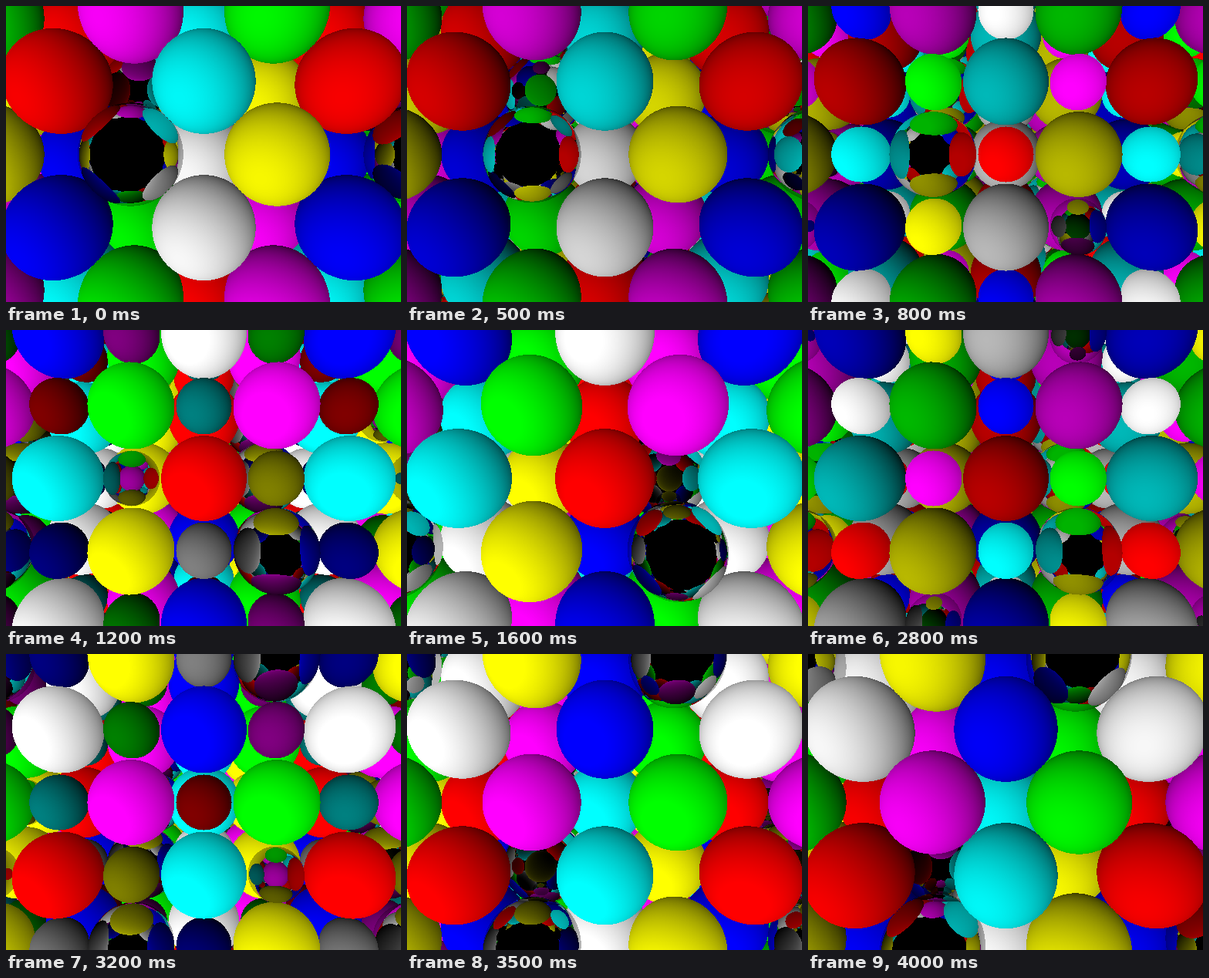
Write an HTML page with a canvas that moves like this. It is 512 by 384 pixels and loops after 4100 ms.

```html
<!DOCTYPE html>
<html lang="en">
<head>
<meta charset="utf-8">
<title>Sliced sphere lattice</title>
<style>
html, body { margin: 0; width: 100%; height: 100%; overflow: hidden; background: #000; }
canvas { display: block; width: 512px; height: 384px; }
</style>
</head>
<body>
<canvas id="view" width="512" height="384"></canvas>
<script>
// A packing of 4D spheres, seen as a 3D slice that moves along w.
const W = 512, H = 384, STEP = 100, COUNT = 41, SPEED = 0.05;
const R = 0.713, R2 = R * R, FOCAL = 466, DIST = 5, LAYERS = 12;
const LIGHT = [-0.4, 0.4, -0.75, -0.6], AMBIENT = 0.5, MIRROR = 0.7;
// RGB bits per colour index; 0 is the mirror
const HUES = [0, 3, 2, 7, 6, 4, 5, 1];
const BLACK = 0xff000000;

const ctx = document.getElementById('view').getContext('2d');
const depth = new Float32Array(W * H);
const owner = new Int16Array(W * H);
const cache = [];

const hueAt = (i, j, k, l) => HUES[(2 * i + j + k + 3 * l - 6) & 7];

function shade(hue, gain, nx, ny, nz, nw) {
  const dot = nx * LIGHT[0] + ny * LIGHT[1] + nz * LIGHT[2] + nw * LIGHT[3];
  const lit = Math.min(1, Math.max(0, AMBIENT + 0.5 * dot / R));
  const v = Math.round(255 * gain * lit);
  return (BLACK | (hue & 4 ? v : 0) | (hue & 2 ? v << 8 : 0) | (hue & 1 ? v << 16 : 0)) >>> 0;
}

// Follows a unit ray from p along d through the lattice, bouncing off mirrors.
function trace(px, py, pz, pw, dx, dy, dz, dw) {
  let gain = MIRROR;
  for (let bounce = 0; bounce < 6; bounce++) {
    let hit = false;
    for (let t = 0.1; t < 14; t += 0.2) {
      const x = px + dx * t, y = py + dy * t, z = pz + dz * t, w = pw + dw * t;
      if (z < -0.75 && dz <= 0) break;
      // nearest lattice point: round, then repair the parity on the worst axis
      let i = Math.round(x), j = Math.round(y), k = Math.round(z), l = Math.round(w);
      if (!((i + j + k + l) & 1)) {
        const ex = x - i, ey = y - j, ez = z - k, ew = w - l;
        const ax = Math.abs(ex), ay = Math.abs(ey), az = Math.abs(ez), aw = Math.abs(ew);
        const m = Math.max(ax, ay, az, aw);
        if (m === ax) i += ex < 0 ? -1 : 1;
        else if (m === ay) j += ey < 0 ? -1 : 1;
        else if (m === az) k += ez < 0 ? -1 : 1;
        else l += ew < 0 ? -1 : 1;
      }
      if (k < 0) continue;
      const vx = i - px, vy = j - py, vz = k - pz, vw = l - pw;
      const b = vx * dx + vy * dy + vz * dz + vw * dw;
      if (b <= 0) continue;
      const disc = b * b - (vx * vx + vy * vy + vz * vz + vw * vw) + R2;
      if (disc <= 0) continue;
      const s = b - Math.sqrt(disc);
      if (s < 1e-4) continue;
      const nx = dx * s - vx, ny = dy * s - vy, nz = dz * s - vz, nw = dw * s - vw;
      const hue = hueAt(i, j, k, l);
      if (hue) return shade(hue, gain, nx, ny, nz, nw);
      px += dx * s; py += dy * s; pz += dz * s; pw += dw * s;
      const g = 2 * (dx * nx + dy * ny + dz * nz + dw * nw) / R2;
      dx -= g * nx; dy -= g * ny; dz -= g * nz; dw -= g * nw;
      gain *= MIRROR;
      hit = true;
      break;
    }
    if (!hit) return BLACK;
  }
  return BLACK;
}

// Spheres cut by the slice at w, front layer first
function slice(w) {
  const list = [];
  for (let k = 0; k < LAYERS; k++) {
    const zc = k + DIST;
    const ni = Math.ceil(zc * W / 2 / FOCAL) + 1, nj = Math.ceil(zc * H / 2 / FOCAL) + 1;
    for (let l = Math.floor(w) - 1; l <= w + 1; l++) {
      const r2 = R2 - (w - l) * (w - l);
      if (r2 <= 0) continue;
      for (let j = -nj; j <= nj; j++)
        for (let i = -ni; i <= ni; i++)
          if ((i + j + k + l) & 1) list.push({ i, j, k, l, r2, hue: hueAt(i, j, k, l) });
    }
  }
  return list;
}

function splat(ball, id) {
  const { i, j, k, r2 } = ball, zc = k + DIST, r = Math.sqrt(r2);
  const far2 = i * i + j * j + zc * zc;
  const half = FOCAL * r * Math.sqrt(far2) / (zc * (zc - r)) + 3;
  const cx = W / 2 + FOCAL * i / zc, cy = H / 2 + FOCAL * j / zc;
  const x0 = Math.max(0, Math.floor(cx - half)), x1 = Math.min(W - 1, Math.ceil(cx + half));
  const y0 = Math.max(0, Math.floor(cy - half)), y1 = Math.min(H - 1, Math.ceil(cy + half));
  for (let y = y0; y <= y1; y++) {
    const Y = (y - H / 2) / FOCAL;
    for (let x = x0; x <= x1; x++) {
      const at = y * W + x;
      if (depth[at] < zc - r) continue;
      const X = (x - W / 2) / FOCAL;
      const a = X * X + Y * Y + 1, b = X * i + Y * j + zc;
      const disc = b * b - a * (far2 - r2);
      if (disc <= 0) continue;
      const s = (b - Math.sqrt(disc)) / a;
      if (s < depth[at]) { depth[at] = s; owner[at] = id; }
    }
  }
}

function render(n) {
  const w = n * SPEED, balls = slice(w);
  const image = ctx.createImageData(W, H), out = new Uint32Array(image.data.buffer);
  depth.fill(1e9);
  owner.fill(-1);
  balls.forEach(splat);
  for (let y = 0, at = 0; y < H; y++) {
    const Y = (y - H / 2) / FOCAL;
    for (let x = 0; x < W; x++, at++) {
      if (owner[at] < 0) { out[at] = BLACK; continue; }
      const X = (x - W / 2) / FOCAL, s = depth[at], b = balls[owner[at]];
      const px = X * s, py = Y * s, pz = s - DIST;
      const nx = px - b.i, ny = py - b.j, nz = pz - b.k, nw = w - b.l;
      if (b.hue) { out[at] = shade(b.hue, 1, nx, ny, nz, nw); continue; }
      const len = Math.sqrt(X * X + Y * Y + 1);
      const dx = X / len, dy = Y / len, dz = 1 / len;
      const g = 2 * (dx * nx + dy * ny + dz * nz) / R2;
      out[at] = trace(px, py, pz, w, dx - g * nx, dy - g * ny, dz - g * nz, -g * nw);
    }
  }
  return image;
}

const picture = n => cache[n] || (cache[n] = render(n));
const start = performance.now();
let shown = -1;

function tick() {
  const n = Math.floor((performance.now() - start) / STEP) % COUNT;
  if (n !== shown) {
    ctx.putImageData(picture(n), 0, 0);
    shown = n;
  } else {
    picture((n + 1) % COUNT); // prepare the next one early
  }
  requestAnimationFrame(tick);
}
tick();
</script>
</body>
</html>
```
